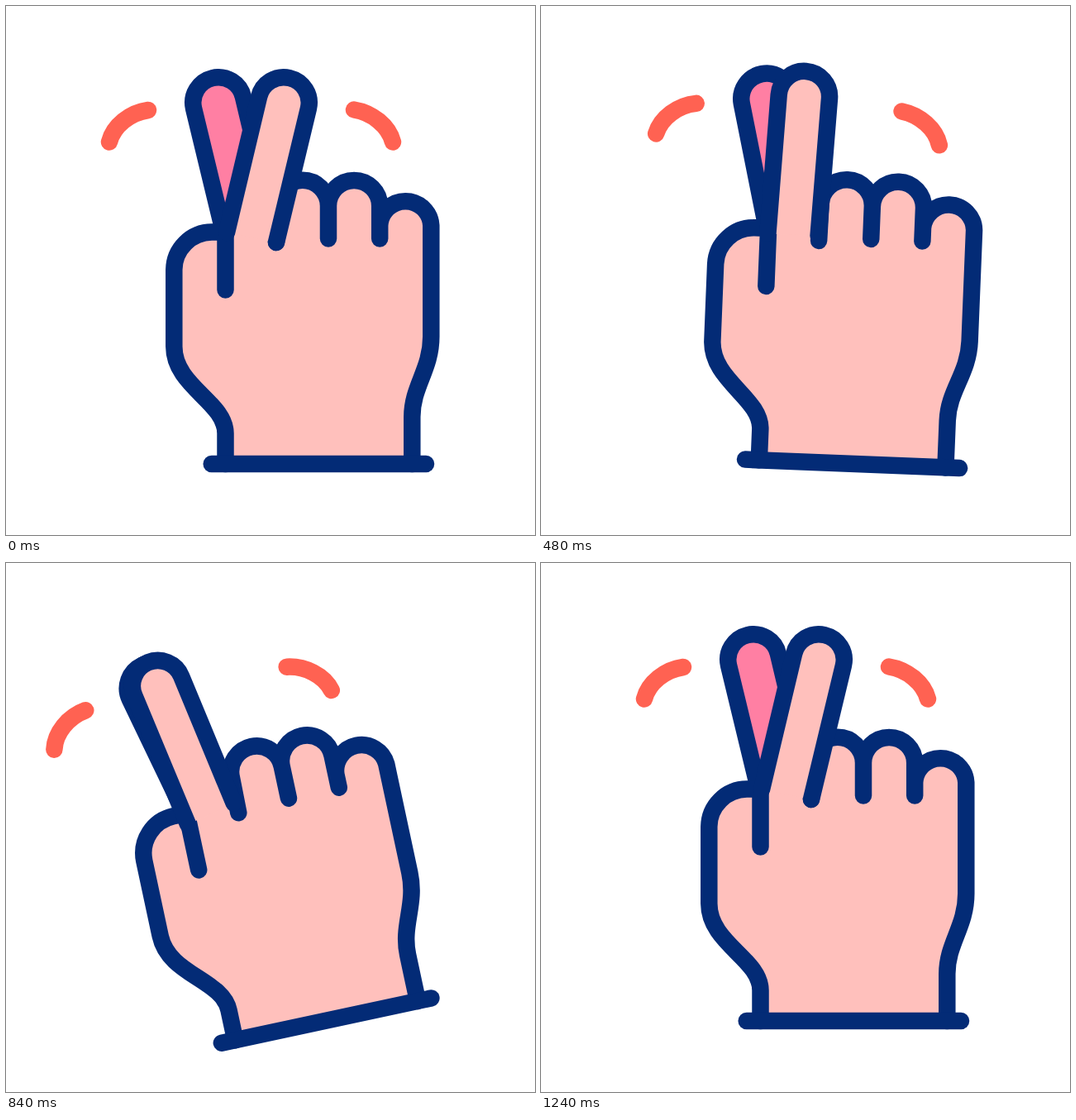
An HTML page that plays this animation: 640x640 px, repeating every 2000 ms.

```html
<!DOCTYPE html>
<html lang="en">
<head>
<meta charset="utf-8">
<title>Crossed fingers</title>
<style>
  html, body { margin: 0; width: 100%; height: 100%; overflow: hidden; background: #fff; }
  svg { display: block; width: 100vw; height: 100vh; }
  path { fill: none; stroke: #032b76; stroke-width: 20.5; stroke-linecap: round; stroke-linejoin: round; }
  .skin { fill: #ffc0bc; }
  .pink { fill: #ff7fa3; }
  .bare { stroke: none; }
  .spark { stroke: #ff6252; }
</style>
</head>
<body>
<svg viewBox="0 0 640 640">
  <g id="hand">
    <path class="spark" d="M125 164.5C130 145 150 129 172 126M421 125.5C443 129 463 145 468 164.5"/>
    <path class="pink" d="M324 266L286.9 109.9A30.7 30.7 0 0 0 227.1 124.1L265.5 283"/>
    <path class="skin bare" d="M265.5 554V517C265.5 479 203.3 460 203.3 412V319A46 46 0 0 1 249 273.5H265.5L327.7 242A31.1 31.1 0 0 1 390 242A31.1 31.1 0 0 1 452.2 242V265.5A31.1 31.1 0 0 1 514.3 265.5V400C514.3 440 491.3 460 491.3 497V554Z"/>
    <path d="M265.5 554V517C265.5 479 203.3 460 203.3 412V319A46 46 0 0 1 249 273.5H265.5V343.5"/>
    <path d="M327 286L327.7 242A31.1 31.1 0 0 1 390 242V281.5M390 242A31.1 31.1 0 0 1 452.2 242V281.5M452.2 265.5A31.1 31.1 0 0 1 514.3 265.5V400C514.3 440 491.3 460 491.3 497V554"/>
    <path d="M248.7 554H508"/>
    <path id="finger" class="skin" d="M267 274L306.1 109.9A30.7 30.7 0 0 1 365.9 124.1L327 286"/>
  </g>
</svg>
<script>
  const LOOP = 2000, STEP = 40;
  const hand = document.getElementById('hand');
  const finger = document.getElementById('finger');

  // [time in ms, hand angle, finger angle]
  const keys = [
    [0, 0, 0],
    [320, -15, -26.5],
    [610, 15, 0],
    [895, -15, -26.5],
    [920, -15, -26.5],
    [1206, 0, 0],
    [LOOP, 0, 0]
  ];

  const ease = p => p * p * (3 - 2 * p);

  function pose(t) {
    const i = keys.findIndex(k => t < k[0]);
    const a = keys[i - 1], b = keys[i];
    const p = ease((t - a[0]) / (b[0] - a[0]));
    return [1, 2].map(n => a[n] + (b[n] - a[n]) * p);
  }

  const start = performance.now();

  function draw() {
    const t = (performance.now() - start) % LOOP;
    const [tilt, bend] = pose(Math.floor(t / STEP) * STEP);
    hand.setAttribute('transform', `rotate(${tilt} 381 510)`);
    finger.setAttribute('transform', `rotate(${bend} 296 287)`);
    requestAnimationFrame(draw);
  }
  draw();
</script>
</body>
</html>
```
